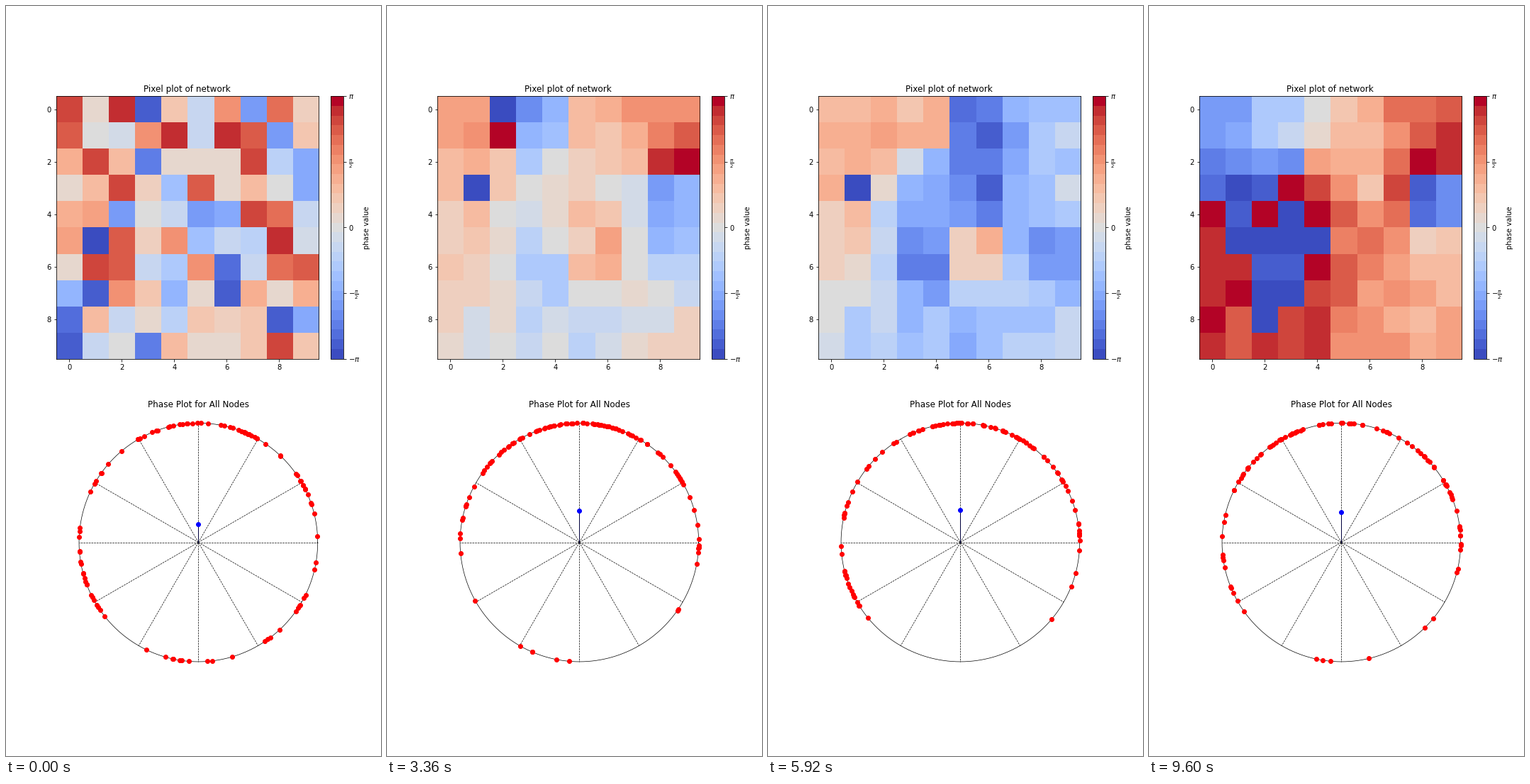
A matplotlib script that plays this animation: 529 by 1058 pixels, repeating every 9.76 s.

```python
import numpy as np
import matplotlib.pyplot as plt
from matplotlib.animation import FuncAnimation

W, H, DPI = 529, 1058, 72
FRAMES, STEP_MS = 61, 160
N, M = 10, 4          # nodes per side, wave points per side
DRIFT = -0.6          # mean phase change per frame, in radians
PINNED = (3, 1)       # a node that keeps its phase

# Times of the waves and the mean field strength there
TIMES = [0, 8, 21, 32, 37, 47, 60]
ORDER = [.15, .295, .265, .095, .27, .083, .253]

# Waves that cross the network after the random start, as coarse phase fields
WAVES = [
    [2, 1.1, 2.8, -1.8, 1.8, -.9, 2.1, .4,
     2.7, 1.6, -2.4, 1, 2.9, 2.6, 2.1, 2.1],
    [1.7, -1.8, 1.1, 1.9, .6, .1, .4, -1.7,
     .5, -1.1, 1.5, -1.2, .1, -.4, -.5, .4],
    [-.2, -1.1, .8, 1.9, 3.1, -2.4, .7, -1.6,
     2.4, 2.1, 1.6, -1.3, 2.1, 2.1, .9, -.2],
    [1.3, .9, -2.4, -.9, .8, -1.5, -2.6, -.6,
     .3, -2.4, .8, -2.3, -.5, -1.1, -1.3, -.6],
    [-.8, 2, -3, -2.3, .6, 2, 2.3, -.2,
     -.3, -2.2, -3, -.1, -.8, -1.5, 2.4, 1.6],
    [-1.6, -.6, 1.2, 2.4, -2.9, 2.95, 1.1, -2.4,
     2.6, -2.6, 2.1, .6, 2.7, 2.8, 1.6, 1.2],
]


def wrap(a):
    return (a + np.pi) % (2 * np.pi) - np.pi


def refine(coarse):
    """Blend an M x M phase field up to the N x N nodes."""
    pos = ((np.arange(N) + .5) * M / N - .5).clip(0, M - 1)
    mix = np.clip(1 - abs(pos[:, None] - np.arange(M)), 0, 1)
    return np.angle(mix @ np.exp(1j * np.reshape(coarse, (M, M))) @ mix.T)


rng = np.random.default_rng(4)
start = rng.uniform(-np.pi, np.pi, (N, N))
start -= .3 * np.sin(start - .7)
noise = rng.uniform(-.4, .4, (N, N))
KEYS = [start] + [refine(w) + noise for w in WAVES]
for key in KEYS[1:]:
    key[PINNED] = np.pi


def phases(i):
    k = min(np.searchsorted(TIMES, i, side="right"), len(TIMES) - 1) - 1
    span = TIMES[k + 1] - TIMES[k]
    turn = DRIFT * span * np.ones((N, N))
    turn[PINNED] = 0
    change = wrap(KEYS[k + 1] - KEYS[k] - turn) + turn
    return wrap(KEYS[k] + change * (i - TIMES[k]) / span)


def add_axes(x, y, w, h):
    return fig.add_axes([x / W, 1 - (y + h) / H, w / W, h / H])


fig = plt.figure(figsize=((W + 1e-4) / DPI, (H + 1e-4) / DPI), dpi=DPI,
                 facecolor="white")
TOP, SIDE = 127.3, 370.3

# Network heat map with its colour bar
grid = add_axes(70.6, TOP, SIDE, SIDE)
image = grid.imshow(phases(0), cmap=plt.get_cmap("coolwarm", 27),
                    vmin=-np.pi, vmax=np.pi, aspect="auto",
                    interpolation="nearest")
grid.set_title("Pixel plot of network")
bar = fig.colorbar(image, cax=add_axes(457.6, TOP, 18.5, SIDE))
bar.set_ticks(np.linspace(-np.pi, np.pi, 5),
              labels=[r"$-\pi$", r"$-\frac{\pi}{2}$", "$0$",
                      r"$\frac{\pi}{2}$", r"$\pi$"])
bar.set_label("phase value")

# Phase circle
ring = add_axes(86.2, 571.5, SIDE, SIDE)
ring.set(xlim=(-1.1, 1.1), ylim=(-1.1, 1.1))
ring.axis("off")
ring.set_title("Phase Plot for All Nodes")
arc = np.linspace(0, 2 * np.pi, 361)
ring.plot(np.cos(arc), np.sin(arc), color="black", lw=.7)
for a in np.arange(12) * np.pi / 6:
    ring.plot([0, np.cos(a)], [0, np.sin(a)], "--", color="black", lw=.7)
nodes, = ring.plot([], [], "o", color="red", ms=6)
stem, = ring.plot([], [], color="#00003c", lw=1)
mean, = ring.plot([], [], "o", color="blue", ms=6)


def draw(i):
    theta = phases(i)
    image.set_data(theta)
    # The ring turns with the mean phase, which always points up
    shown = theta.ravel() - np.angle(np.exp(1j * theta).sum()) + np.pi / 2
    nodes.set_data(np.cos(shown), np.sin(shown))
    r = np.interp(i, TIMES, ORDER)
    stem.set_data([0, 0], [0, r])
    mean.set_data([0], [r])
    return image, nodes, stem, mean


anim = FuncAnimation(fig, draw, frames=FRAMES, interval=STEP_MS,
                     repeat=True, repeat_delay=0)
plt.show()
```
